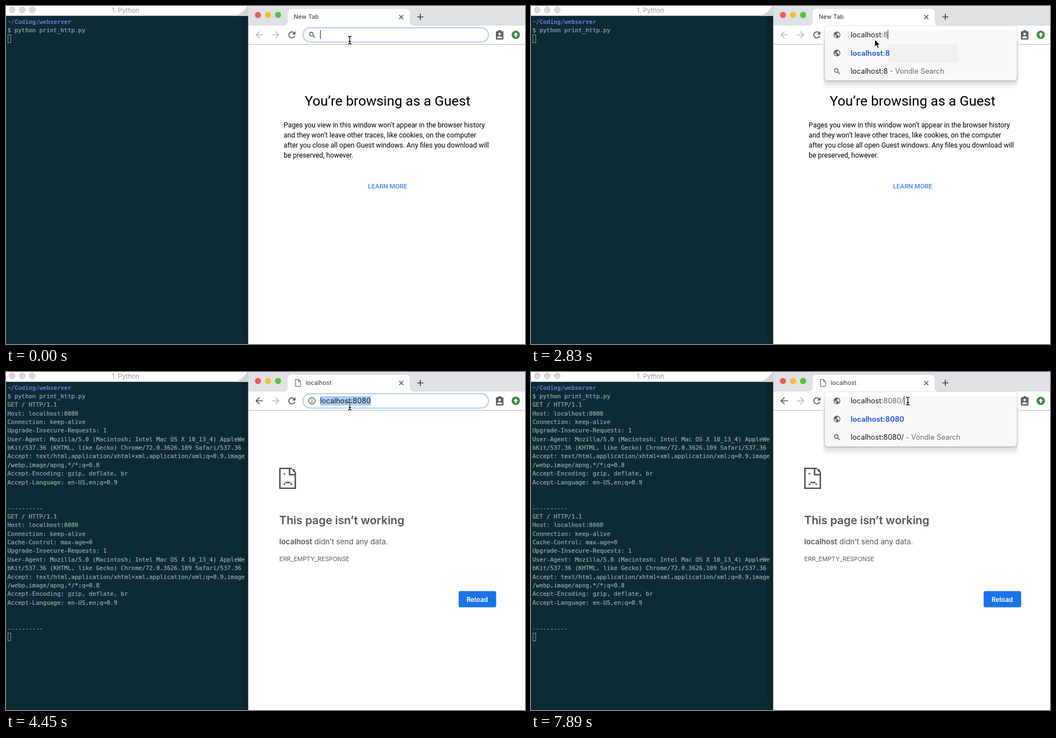
An HTML page for the animation above (8 s loop, 927 by 604 pixels).

```html
<!DOCTYPE html>
<html lang="en">
<head>
<meta charset="utf-8">
<title>Print HTTP requests</title>
<style>
  html, body { margin: 0; width: 100%; height: 100%; overflow: hidden; background: #fff; }
  svg { display: block; width: 100%; height: 100%; }
  text { white-space: pre; font-family: Inter, sans-serif; }
  #output text { font: 10.53px "DejaVu Sans Mono", monospace; fill: #9dabab; stroke: #9dabab; stroke-width: .2; }
  #output .path { font-weight: bold; fill: #6f76d2; stroke: none; }
  .tab { font-size: 10.7px; fill: #33363a; }
  .bar { font-size: 12.8px; fill: #17191b; }
  .soft { fill: #6a6d71; }
  .link { font-weight: 700; fill: #2b63dc; }
  #guest text { font: 12.3px Roboto, sans-serif; fill: #000; }
  #guest .title { font-size: 24.6px; }
  #guest .more { font-size: 11.5px; font-weight: 500; fill: #4285f4; }
  #error text { fill: #55575a; }
  .line { fill: none; stroke: #5f6368; stroke-width: 1.6; }
</style>
</head>
<body>
<svg viewBox="0 0 927 604">
  <defs>
    <g id="search" class="line"><circle cx="-1.2" cy="-1.2" r="3.3" stroke-width="1.4"/><path d="M1.3 1.3L5 5"/></g>
    <g id="globe">
      <circle r="6" fill="#5f6368"/>
      <path d="M-4.6-.8L-1.2 2.4V4.7Q-4.6 3.5-4.6-.8ZM1.2-4.4Q4.4-3.2 4.7 0 4.6 1.8 3.5 3.1L2.3 2V.2H-1.2V-1H.2V-2.4H1.4Z" fill="#fff"/>
    </g>
    <g id="info" class="line"><circle r="5.8" stroke-width="1.4"/><path d="M0-3.2v1.5M0-.6v3.8"/></g>
    <path id="arrow" d="M6.5 0H-5.5M.2-6L-5.7 0 .2 6" fill="none" stroke-width="1.7"/>
    <path id="beamLine" d="M-3-7Q0-7 0-5V5Q0 7-3 7M3-7Q0-7 0-5M0 5Q0 7 3 7M-2 2.5H2" fill="none"/>
    <g id="beam">
      <use href="#beamLine" stroke="#fff" stroke-width="3"/>
      <use href="#beamLine" stroke="#111" stroke-width="1.3"/>
    </g>
    <path id="pointer" d="M0 0V13L3 10.2 5.3 15.4 7.6 14.4 5.3 9.4H9.4Z" fill="#000" stroke="#fff"/>
  </defs>

  <rect width="927" height="604" fill="#fff"/>

  <g id="terminal">
    <rect y="17.5" width="433" height="587" fill="#0d2b34"/>
    <path d="M420 18H433V604H430Q420 590 420 570Z" fill="#0b252d"/>
    <path d="M410 17.5Q424 12 431 0H433V17.5Z" fill="#d4d6d6"/>
    <g fill="#dadada" stroke="#cacaca">
      <circle cx="11" cy="7" r="5.2"/><circle cx="29" cy="7" r="5.2"/><circle cx="47" cy="7" r="5.2"/>
    </g>
    <text x="189" y="11.7" font-size="11.4" fill="#9b9b9b">1. Python</text>
    <g id="output"></g>
    <rect id="block" x="3.5" width="5" height="14" fill="none" stroke="#8a9696"/>
    <rect x="432" y="18" width="1" height="586" fill="#6f7d80"/>
  </g>

  <g id="browser">
    <rect x="433" width="494" height="604" fill="#fff"/>
    <rect x="433" width="494" height="35" fill="#dee1e6"/>
    <rect x="433" y="68" width="494" height="1" fill="#b4b6b9"/>
    <circle cx="450" cy="16" r="5.5" fill="#ee5c54"/>
    <circle cx="468" cy="16" r="5.5" fill="#f6bd35"/>
    <circle cx="486" cy="16" r="5.5" fill="#5dbf3d"/>
    <path d="M496 35Q503 35 503 28V12Q503 5 510 5H714Q721 5 721 12V28Q721 35 728 35Z" fill="#fff"/>
    <path d="M702.3 16l7.4 7.4M709.7 16l-7.4 7.4" class="line"/>
    <path d="M734.5 19.5h11M740 14v11" class="line" style="stroke:#3c4043"/>
    <path id="tabIcon" d="M517 13.5h5.5l3.5 3.5v8.5h-9ZM522.5 13.5V17H526" class="line" style="stroke-width:1.1"/>
    <text id="tabTitle" class="tab" y="23.4"></text>

    <use id="back" href="#arrow" x="452.5" y="51.5"/>
    <use href="#arrow" transform="translate(481.5 51.5) scale(-1 1)" stroke="#b8babd"/>
    <path d="M514.4 47.8A5.4 5.4 0 1 0 515.8 53" class="line" style="stroke-width:1.8"/>
    <path d="M517 45V51H511Z" fill="#5f6368"/>
    <rect x="530.5" y="38.8" width="331.3" height="25.6" rx="12.8" fill="#fff" stroke="#aecff7" stroke-width="2"/>
    <g fill="#5f6368">
      <rect x="875" y="45" width="13.5" height="15" rx="1.5"/><rect x="879" y="43" width="5.5" height="4" rx="2"/>
    </g>
    <g fill="#fff"><circle cx="881.7" cy="50" r="2.2"/><path d="M877.2 57.5V56Q881.7 51.8 886.2 56V57.5Z"/></g>
    <circle cx="910.5" cy="51.5" r="7.4" fill="#3c8d40"/>
    <path d="M910.5 47L914.7 51.7H912V55.5H909V51.7H906.3Z" fill="#fff"/>

    <g id="guest">
      <text x="533.5" y="178" class="title">You’re browsing as a Guest</text>
      <text x="496" y="217">Pages you view in this window won’t appear in the browser history</text>
      <text x="496" y="235.2">and they won’t leave other traces, like cookies, on the computer</text>
      <text x="496" y="253.3">after you close all open Guest windows. Any files you download will</text>
      <text x="496" y="271.4">be preserved, however.</text>
      <text x="646.5" y="325.6" class="more">LEARN MORE</text>
    </g>

    <g id="error">
      <g fill="none" stroke="#535353" stroke-width="2.6">
        <path d="M511 172.2H489.2V207.8H516.8V179M506.5 172V183.5H518M511 174.8H514V177.5H517"/>
        <path d="M496 182H498.6M499 197.5H508M496 200.5H499M508 200.5H511"/>
      </g>
      <text x="488" y="272" font-size="19.9" font-weight="600">This page isn’t working</text>
      <text x="488" y="307.5" font-size="13.35"><tspan font-weight="600">localhost</tspan> didn’t send any data.</text>
      <text x="488.2" y="338.2" font-size="10.75">ERR_EMPTY_RESPONSE</text>
      <rect x="808.5" y="391.5" width="67" height="29" rx="3" fill="#1a73e8"/>
      <text x="841.7" y="410.5" font-size="11.5" font-weight="600" text-anchor="middle" style="fill:#fff">Reload</text>
    </g>

    <g id="dropdown"></g>
    <rect id="selection" x="561" y="43" width="91" height="17" fill="#a9cef8"/>
    <use id="urlIcon" x="546.5" y="51.5"/>
    <text id="url" class="bar" y="56"></text>
    <rect id="caret" y="43" width="1" height="16" fill="#222"/>
  </g>
  <use id="mouse"/>
</svg>

<script>
const LOOP = 8000;
const ROW_HEIGHT = 15.36;
const ENGINE = 'Vondle Search';
const $ = id => document.getElementById(id);
const show = (id, visible) => { $(id).style.display = visible ? '' : 'none'; };

// Each step changes some fields; rows lists the suggestions: s = search, u = address.
const steps = [
  [0, { url: '', caret: 0, rows: '', mouse: ['beam', 614, 61], requests: 0, failed: false, selected: false, tint: '#fff', shade: [525, 867] }],
  [150, { caret: null }],
  [450, { url: 'l', caret: 1, rows: 's' }],
  [600, { url: 'lo', caret: 2 }],
  [750, { url: 'loc', caret: 3 }],
  [900, { url: 'locl', caret: 4 }],
  [1350, { caret: null }],
  [1500, { url: 'loc', caret: 3 }],
  [1640, { url: 'loca', caret: 4 }],
  [1940, { url: 'localho', caret: 7 }],
  [2080, { url: 'localhost', caret: 9, rows: 'us', mouse: ['pointer', 614, 60], tint: '#f8f8f8', shade: null }],
  [2380, { url: 'localhost:', caret: 10, rows: 'su', shade: [540, 731] }],
  [2830, { url: 'localhost:8', caret: 11, rows: 'us', shade: [637, 763] }],
  [2970, { url: 'localhost:80', caret: 12 }],
  [3120, { url: 'localhost:8080', caret: 14 }],
  [3560, { caret: null }],
  [3700, { rows: '', mouse: ['beam', 614, 61] }],
  [3850, { requests: 1 }],
  [4150, { failed: true }],
  [4300, { requests: 2 }],
  [4450, { selected: true }],
  [5500, { mouse: null }],
  [5800, { selected: false, caret: 0 }],
  [6240, { caret: 1 }],
  [6690, { mouse: ['beam', 667, 48] }],
  [6840, { mouse: ['beam', 685, 61] }],
  [6990, { mouse: ['beam', 680, 56] }],
  [7140, { mouse: ['beam', 673, 52], caret: 14 }],
  [7590, { caret: null }],
  [7890, { url: 'localhost:8080/', caret: 15, rows: 'us', shade: null }],
];

const request = extra => [
  'GET / HTTP/1.1',
  'Host: localhost:8080',
  'Connection: keep-alive',
  ...extra,
  'Upgrade-Insecure-Requests: 1',
  'User-Agent: Mozilla/5.0 (Macintosh; Intel Mac OS X 10_13_4) AppleWe',
  'bKit/537.36 (KHTML, like Gecko) Chrome/72.0.3626.109 Safari/537.36',
  'Accept: text/html,application/xhtml+xml,application/xml;q=0.9,image',
  '/webp,image/apng,*/*;q=0.8',
  'Accept-Encoding: gzip, deflate, br',
  'Accept-Language: en-US,en;q=0.9',
  '', '', '----------',
];
const requests = [request([]), request(['Cache-Control: max-age=0'])];

function drawTerminal(count) {
  const lines = ['~/Coding/webserver', '$ python print_http.py', ...requests.slice(0, count).flat()];
  $('output').innerHTML = lines.map((line, i) =>
    `<text x="2.5" y="${31.6 + i * ROW_HEIGHT}"${i ? '' : ' class="path"'}>${line}</text>`).join('');
  $('block').setAttribute('y', Math.round(20.6 + lines.length * ROW_HEIGHT) + 0.5);
}

function suggestion(kind, i, url) {
  const y = 84 + i * 32.5;
  const address = url.replace(/[:/]$/, '');
  const label = kind === 'u'
    ? `<tspan class="link">${address}</tspan>`
    : `${url}<tspan class="soft"> - ${ENGINE}</tspan>`;
  return `<use href="#${kind === 'u' ? 'globe' : 'search'}" x="546.5" y="${y}"/>
    <text class="bar" x="571" y="${y + 4.5}">${label}</text>`;
}

function drawDropdown({ rows, url, tint, shade }) {
  const bottom = 68 + rows.length * 32.5;
  const panel = (left, top, right, end, fill, extra = '') =>
    `<rect x="${left}" y="${top}" width="${right - left}" height="${end - top}" fill="${fill}" ${extra}/>`;
  $('dropdown').innerHTML = rows && `
    ${panel(521, 60, 871.5, bottom + 14, '#f6f6f6', 'rx="8"')}
    ${panel(523.5, 60, 869, bottom + 9, '#e8e8e8', 'rx="8"')}
    ${panel(525, 36, 867.5, bottom, '#fff', 'rx="6" style="filter:drop-shadow(0 1px 2px rgba(0,0,0,.3))"')}
    ${panel(525, 43, 867.5, bottom, tint, 'rx="6"')}
    ${shade ? panel(shade[0], 68, shade[1], 100.5, '#f0f0f0') : ''}
    ${[...rows].map((kind, i) => suggestion(kind, i, url)).join('')}`;
}

function drawAddress({ url, rows, caret, selected }) {
  const x = rows ? 571 : 561;
  const [host, port] = url.split(/(?=:.)/);
  const text = $('url');
  text.setAttribute('x', x);
  text.innerHTML = host + (port ? `<tspan class="${selected ? '' : 'soft'}">${port}</tspan>` : '');
  const icon = rows ? (rows[0] === 'u' ? 'globe' : 'search') : url ? 'info' : 'search';
  $('urlIcon').setAttribute('href', '#' + icon);
  show('selection', selected);
  show('caret', caret !== null);
  $('caret').setAttribute('x', Math.round(x + (caret ? text.getSubStringLength(0, caret) : 0)));
}

function draw(state) {
  const { failed, mouse } = state;
  drawTerminal(state.requests);
  drawDropdown(state);
  drawAddress(state);
  show('guest', !failed);
  show('error', failed);
  show('tabIcon', failed);
  $('tabTitle').textContent = failed ? 'localhost' : 'New Tab';
  $('tabTitle').setAttribute('x', failed ? 535.5 : 514);
  $('back').setAttribute('stroke', failed ? '#505459' : '#b8babd');
  show('mouse', mouse);
  if (mouse) {
    $('mouse').setAttribute('href', '#' + mouse[0]);
    $('mouse').setAttribute('transform', `translate(${mouse[1]} ${mouse[2]})`);
  }
}

let shown = -1;
function tick(now) {
  const time = now % LOOP;
  const current = steps.findLastIndex(([start]) => start <= time);
  if (current !== shown) {
    shown = current;
    draw(Object.assign({}, ...steps.slice(0, current + 1).map(step => step[1])));
  }
  requestAnimationFrame(tick);
}
tick(0);
</script>
</body>
</html>
```
